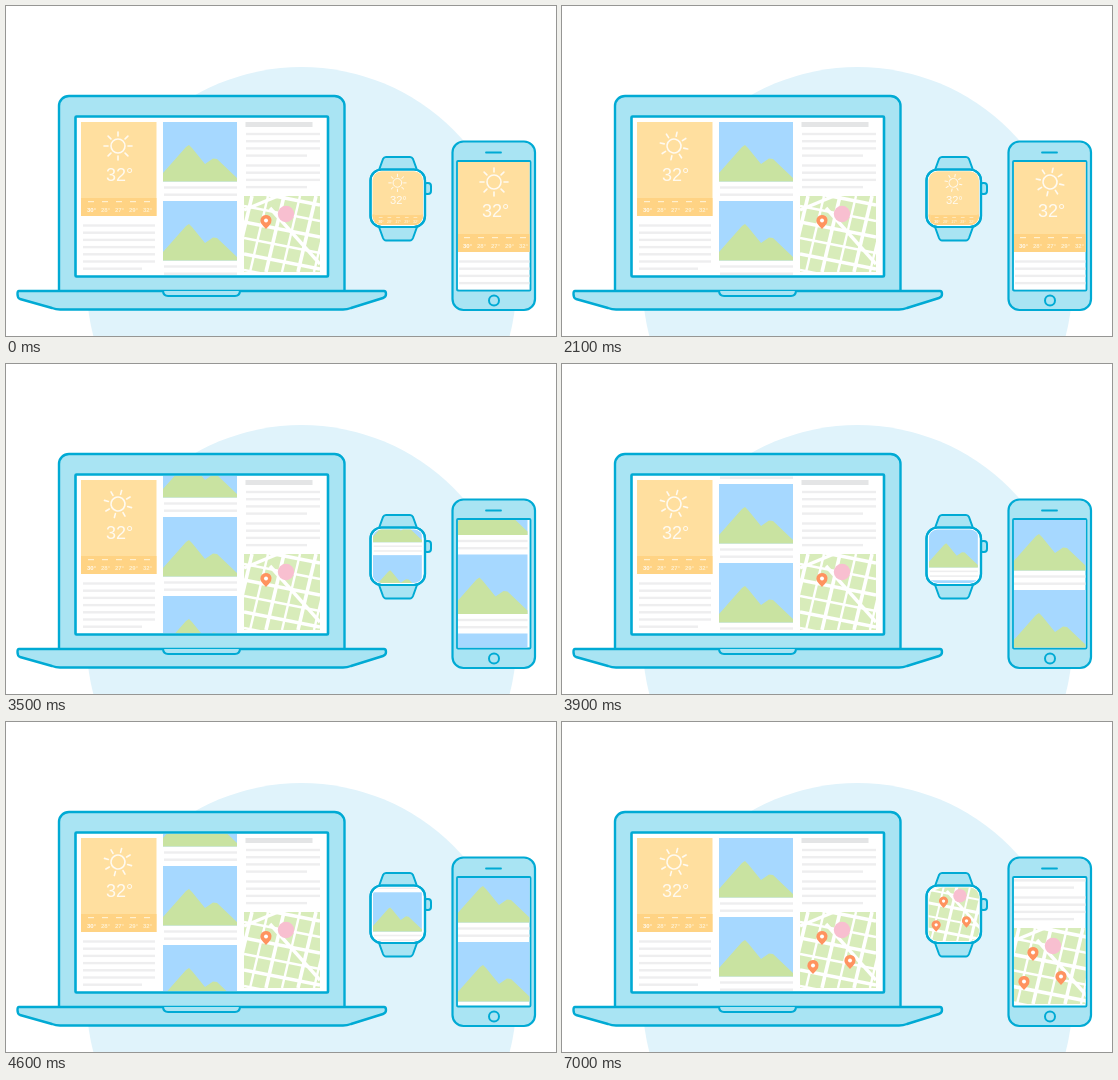
Write an HTML page with a canvas that moves like this. It is 550 by 330 pixels and loops after 7100 ms.

```html
<!DOCTYPE html>
<html lang="en">
<head>
<meta charset="utf-8">
<title>Responsive widgets</title>
<style>
html, body { margin: 0; width: 100%; height: 100%; overflow: hidden; background: #fff; }
canvas { display: block; width: 550px; height: 330px; }
</style>
</head>
<body>
<canvas id="stage"></canvas>
<script>
const LOOP = 7100, STEP = 100, PITCH = 79;
const BLUE = '#00aad4', PALE = '#a9e4f3', ORANGE = '#ff935f';
const canvas = document.getElementById('stage');
const ctx = canvas.getContext('2d');
const dpr = window.devicePixelRatio || 1;
canvas.width = 550 * dpr;
canvas.height = 330 * dpr;

const clamp = v => Math.max(0, Math.min(1, v));
const smooth = v => v * v * (3 - 2 * v);
const phase = (t, from, to) => smooth(clamp((t - from) / (to - from)));

// Linear track through [time, value] pairs.
function track(t, keys) {
  if (t <= keys[0][0]) return keys[0][1];
  for (let i = 1; i < keys.length; i++) {
    const [t0, v0] = keys[i - 1], [t1, v1] = keys[i];
    if (t <= t1) return v0 + (v1 - v0) * (t - t0) / (t1 - t0);
  }
  return keys[keys.length - 1][1];
}

function rect(x, y, w, h, color) {
  ctx.fillStyle = color;
  ctx.fillRect(x, y, w, h);
}

function poly(points, color) {
  ctx.beginPath();
  points.forEach(([x, y]) => ctx.lineTo(x, y));
  ctx.closePath();
  ctx.fillStyle = color;
  ctx.fill();
}

function disc(x, y, r, color) {
  ctx.beginPath();
  ctx.arc(x, y, r, 0, Math.PI * 2);
  ctx.fillStyle = color;
  ctx.fill();
}

function line(x0, y0, x1, y1) {
  ctx.beginPath();
  ctx.moveTo(x0, y0);
  ctx.lineTo(x1, y1);
  ctx.stroke();
}

function outline(path, fill = PALE, width = 2.4) {
  ctx.fillStyle = fill;
  ctx.fill(path);
  ctx.strokeStyle = BLUE;
  ctx.lineWidth = width;
  ctx.lineJoin = ctx.lineCap = 'round';
  ctx.stroke(path);
}

function rounded(x, y, w, h, r) {
  const path = new Path2D();
  path.roundRect(x, y, w, h, r);
  return path;
}

function within(path, draw) {
  ctx.save();
  ctx.clip(path);
  draw();
  ctx.restore();
}

function at(x, y, scale, draw) {
  ctx.save();
  ctx.translate(x, y);
  ctx.scale(scale, scale);
  draw();
  ctx.restore();
}

function textLines(x, y, count, width, last = width) {
  for (let i = 0; i < count; i++) {
    rect(x, y + i * 7.2 - 1.2, i === count - 1 ? last : width, 2.4, '#eeeeef');
  }
}

function sun(x, y, angle) {
  ctx.save();
  ctx.translate(x, y);
  ctx.rotate(angle);
  ctx.strokeStyle = '#fffaf0';
  ctx.lineWidth = 1.6;
  ctx.lineCap = 'round';
  ctx.beginPath();
  ctx.arc(0, 0, 7, 0, Math.PI * 2);
  ctx.stroke();
  for (let i = 0; i < 8; i++) {
    line(10, 0, 14, 0);
    ctx.rotate(Math.PI / 4);
  }
  ctx.restore();
}

function weather(t) {
  rect(0, 0, 75.5, 94, '#ffdf9f');
  rect(0, 76, 75.5, 18, '#ffd384');
  sun(37, 24, phase(t, 0, 2400) * Math.PI / 3);
  ctx.fillStyle = '#fffaf0';
  ctx.textAlign = 'center';
  ctx.font = '18px "Liberation Sans", Arial, sans-serif';
  ctx.fillText('32°', 38.5, 58.5);
  ctx.font = 'bold 6px "Liberation Sans", Arial, sans-serif';
  ['30°', '28°', '27°', '29°', '32°'].forEach((label, i) => {
    ctx.fillText(label, 10.5 + i * 14, 89.5);
    rect(7 + i * 14, 79, 6, 1.2, '#fff0cf');
  });
  textLines(2, 103.5, 7, 72, 59);
}

function photo() {
  rect(0, 0, 74, 59.5, '#a6d8ff');
  poly([[0, 51], [23, 25], [26, 23], [29, 26], [42, 42], [50, 36.5], [54, 37],
    [74, 56], [74, 59.5], [0, 59.5]], '#c9e3a1');
  textLines(1, 65.5, 2, 73);
}

function photos(scroll) {
  const shift = scroll % PITCH;
  for (let k = -1; k < 4; k++) at(0, k * PITCH - shift, 1, photo);
}

function pin(x, y, size) {
  if (size <= 0) return;
  at(x, y, size, () => {
    ctx.beginPath();
    ctx.arc(0, -0.5, 5.6, Math.PI * 0.86, Math.PI * 2.14);
    ctx.quadraticCurveTo(3, 5, 0, 8);
    ctx.quadraticCurveTo(-3, 5, -5.1, 1.9);
    ctx.fillStyle = ORANGE;
    ctx.fill();
    disc(0, -0.5, 2, '#fff');
  });
}

function map(sizes) {
  const box = new Path2D();
  box.rect(0, 0, 76, 76);
  within(box, () => {
    rect(0, 0, 76, 76, '#d8ecba');
    ctx.strokeStyle = '#fff';
    ctx.lineCap = 'butt';
    for (let i = 0; i < 6; i++) {
      ctx.lineWidth = i % 2 ? 2.4 : 3.6;
      line(0, -6 + i * 16, 76, 9 + i * 16);
      line(8 + i * 16, 0, -10 + i * 16, 76);
    }
    ctx.lineWidth = 3.4;
    line(0, 14, 34, 0);
    line(26, 12, 76, 68);
  });
  disc(42, 18, 8.2, '#f8bfd0');
  pin(22, 25, sizes[0]);
  pin(50, 49, sizes[1]);
  pin(13, 54, sizes[2]);
}

// Article column, with its origin at the top left of the map.
function article(sizes) {
  rect(1.5, -74, 67, 5, '#e4e5e6');
  textLines(2, -62, 4, 74, 61);
  textLines(2, -30.5, 4, 74, 61);
  map(sizes);
}

// Three pages side by side, moved by two short slides.
function pages(t, left, width, draws) {
  const pos = phase(t, 2450, 2850) + phase(t, 4750, 5100);
  draws.forEach((draw, i) => {
    if (Math.abs(i - pos) < 1) {
      ctx.save();
      ctx.translate((i - pos) * width, 0);
      draw();
      ctx.restore();
    }
  });
}

function laptop(t, sizes) {
  outline(rounded(53, 90, 285.5, 205, [10, 10, 0, 0]));
  const screen = rounded(69.5, 110.5, 252.5, 160, 1);
  outline(screen, '#fff', 2.6);
  const scroll = track(t, [[2600, 0], [2850, 2], [3100, 11], [3500, 42], [3900, 75],
    [4600, 130], [4900, 149], [5150, 158]]);
  within(rounded(71, 112, 249.5, 157, 0), () => {
    at(75, 116, 1, () => weather(t));
    at(157, 116, 1, () => photos(scroll));
    at(238, 190, 1, () => article(sizes));
  });
  outline(new Path2D('M13 285H378Q380 285 380 288Q380 291 377 292L345 302Q341 303.5 337 303.5H54Q50 303.5 46 302L14 293Q11.500 292 11.500 288Q11.500 285 13 285Z'));
  outline(new Path2D('M157 285Q157.500 290 162 290H229Q233.500 290 234 285'), PALE, 2.2);
}

function watch(t, sizes) {
  outline(new Path2D('M373 164L377 153Q378 151 380 151H404Q406 151 407 153L411 164Z'), PALE, 2);
  outline(new Path2D('M373 221L377 232Q378 234.500 380 234.500H404Q406 234.500 407 232L411 221Z'), PALE, 2);
  outline(rounded(418, 177, 7, 11, 3), PALE, 2);
  const body = rounded(364.5, 163.5, 54.5, 57.5, 11);
  outline(body, '#fff', 2.2);
  const scroll = track(t, [[2700, -6], [3100, 0], [3900, 54], [4600, 100], [5000, 116]]);
  within(rounded(366.5, 165.5, 50.5, 53.5, 9), () => pages(t, 366, 52, [
    () => {
      rect(366, 164, 52, 57, '#ffdf9f');
      rect(366, 208.5, 52, 13, '#ffd384');
      at(368.5, 162, 0.62, () => weather(t));
    },
    () => at(367, 166, 0.66, () => photos(scroll / 0.66 + PITCH)),
    () => at(363.5, 159, 0.82, () => article(sizes))
  ]));
  outline(body, 'transparent', 2.2);
}

function phone(t, sizes) {
  outline(rounded(446.5, 135.5, 82.5, 168.5, 11), PALE, 2.2);
  const screen = rounded(451, 155, 73.5, 129.5, 1);
  outline(screen, '#fff', 1.8);
  ctx.lineWidth = 1.8;
  line(480, 146.5, 495, 146.5);
  const home = new Path2D();
  home.arc(488, 294.500, 5, 0, Math.PI * 2);
  outline(home, PALE, 2);
  const scroll = track(t, [[2700, -10], [3100, 0], [3900, 87], [4600, 172], [5000, 205]]);
  const drift = track(t, [[2500, 0], [2900, -7], [3100, -7], [3900, 0]]);
  within(rounded(452, 156, 71.5, 127.5, 0), () => pages(t, 451, 74, [
    () => at(451, 152, 1, () => weather(t)),
    () => at(451 + drift, 155, 1, () => photos(scroll + PITCH)),
    () => at(449, 206, 1, () => article(sizes))
  ]));
}

function draw(t) {
  ctx.setTransform(dpr, 0, 0, dpr, 0, 0);
  rect(0, 0, 550, 330, '#fff');
  disc(295.5, 276, 215, '#e0f3fb');
  const third = phase(t, 5800, 6200);
  const pins = [1, phase(t, 4800, 5200), third];
  laptop(t, pins);
  watch(t, [1, phase(t, 5200, 5600), third]);
  phone(t, pins);
}

const start = performance.now();
function frame() {
  const t = (performance.now() - start) % LOOP;
  draw(Math.floor(t / STEP) * STEP);
  requestAnimationFrame(frame);
}
frame();
</script>
</body>
</html>
```
